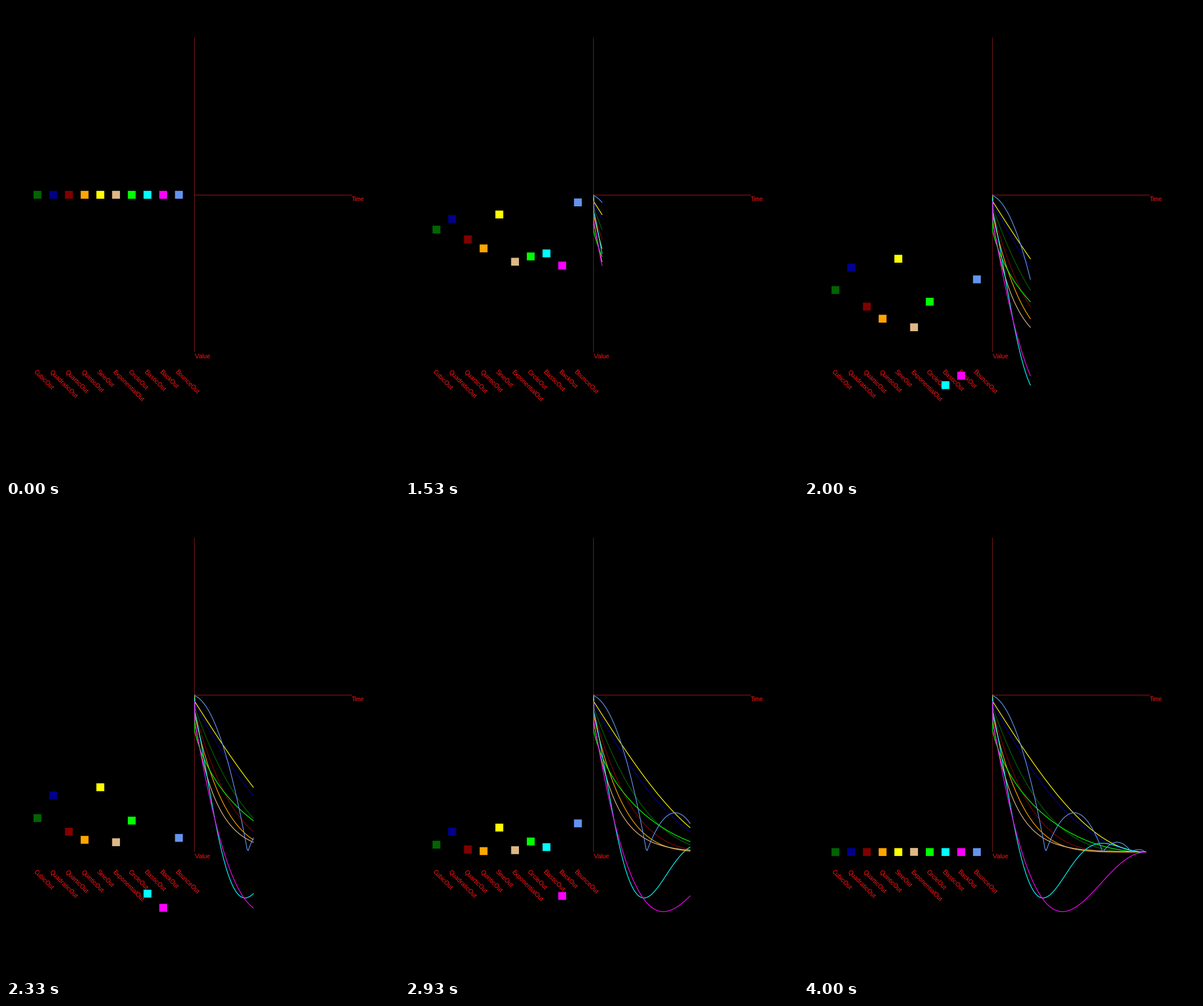
Recreate the animation shown at these times as a matplotlib script. Size 683 by 820 pixels, loop 5.36 s.

```python
import numpy as np
import matplotlib.pyplot as plt
from matplotlib.animation import FuncAnimation
from matplotlib.patches import Rectangle

W, H, DPI = 683, 820, 64
LOOP, TICK = 5360, 20          # ms
START, STEPS = 1370, 75        # tween start in ms, steps of 1/30 s
LAG = 4 / 150                  # plots advance in x only after this delay

UNIT = 0.04 * W                # column spacing
SPAN = 0.4 * W                 # axis and travel length
OX, OY = 0.48 * W, 0.4 * H     # plot origin
BOX = UNIT / 2
RED, V_AXIS, H_AXIS = "#ff1414", "#7c1818", "#a01616"

# Crisp stems for small text.
plt.rcParams["text.hinting"] = "native"
plt.rcParams["text.hinting_factor"] = 1


def power(n):
    return lambda v: v ** n


def elastic(v):
    swell = (np.exp(3 * v) - 1) / (np.exp(3) - 1)
    return swell * np.sin(2.5 * np.pi * v)


def bounce(v):
    t = 1 - v
    k = 7.5625
    return 1 - np.select(
        [t < 1 / 2.75, t < 2 / 2.75, t < 2.5 / 2.75],
        [k * t ** 2, k * (t - 1.5 / 2.75) ** 2 + 0.75,
         k * (t - 2.25 / 2.75) ** 2 + 0.9375],
        k * (t - 2.625 / 2.75) ** 2 + 0.984375)


# Each easing is given in its "in" form and flipped by ease_out.
EASINGS = [
    ("CubicOut", "darkgreen", power(3)),
    ("QuadraticOut", "darkblue", power(2)),
    ("QuarticOut", "#800000", power(4)),
    ("QuinticOut", "orange", power(5)),
    ("SineOut", "yellow", lambda v: 1 - np.cos(np.pi / 2 * v)),
    ("ExponentialOut", "burlywood", lambda v: 2.0 ** (10 * (v - 1))),
    ("CircleOut", "lime", lambda v: 1 - np.sqrt(1 - v ** 2)),
    ("ElasticOut", "cyan", elastic),
    ("BackOut", "magenta", lambda v: v ** 3 - v * np.sin(np.pi * v)),
    ("BounceOut", "cornflowerblue", bounce),
]


def ease_out(ease_in, t):
    return 1 - ease_in(1 - np.asarray(t, dtype=float))


fig = plt.figure(figsize=(W / DPI, H / DPI), dpi=DPI, facecolor="black")
ax = fig.add_axes([0, 0, 1, 1])
ax.set_xlim(0, W)
ax.set_ylim(H, 0)
ax.axis("off")


def px(n):
    return n * 72 / DPI


def label(x, y, text, angle=0):
    ax.text(x, y, text, color=RED, family="Liberation Sans", size=px(11),
            rotation=angle, rotation_mode="anchor",
            ha="left", va="baseline", zorder=1)


def rect(x, y, w, h, color, z):
    return ax.add_patch(Rectangle((x, y), w, h, fc=color, lw=0,
                                  snap=False, zorder=z))


rect(327, 55, 1, 546, V_AXIS, 1)
rect(327, 328, 274, 1, H_AXIS, 1)
label(601, 339, "Time")
label(328, 612, "Value")

times = np.arange(1, 2 * STEPS + 1) / (2 * STEPS)
plot_x = OX + SPAN * np.maximum(times - LAG, 0)

boxes, curves, plots = [], [], []
for i, (name, color, ease_in) in enumerate(EASINGS):
    cx = UNIT * (i + 2)
    label(cx - 7, 636.5, name, -45)
    boxes.append(rect(cx - BOX / 2, 0, BOX, BOX, color, 3))
    curve, = ax.plot([], [], color=color, lw=px(1.25), snap=False,
                     solid_capstyle="projecting", zorder=2)
    curves.append(curve)
    plots.append(OY + SPAN * ease_out(ease_in, times))


def update(i):
    now = i * TICK + TICK // 2
    # Steps land on 10 ms marks, rounded down from thirds.
    step = min(max((now + 9 - START) * 3 // 100 + 1, 0), STEPS)
    n = 2 * step
    for box, curve, ys in zip(boxes, curves, plots):
        cy = ys[n - 1] if n else OY
        box.set_y(cy - BOX / 2)
        curve.set_data(plot_x[:n], ys[:n])
    return boxes + curves


anim = FuncAnimation(fig, update, frames=LOOP // TICK, interval=TICK,
                     repeat=True, repeat_delay=0)
plt.show()
```
